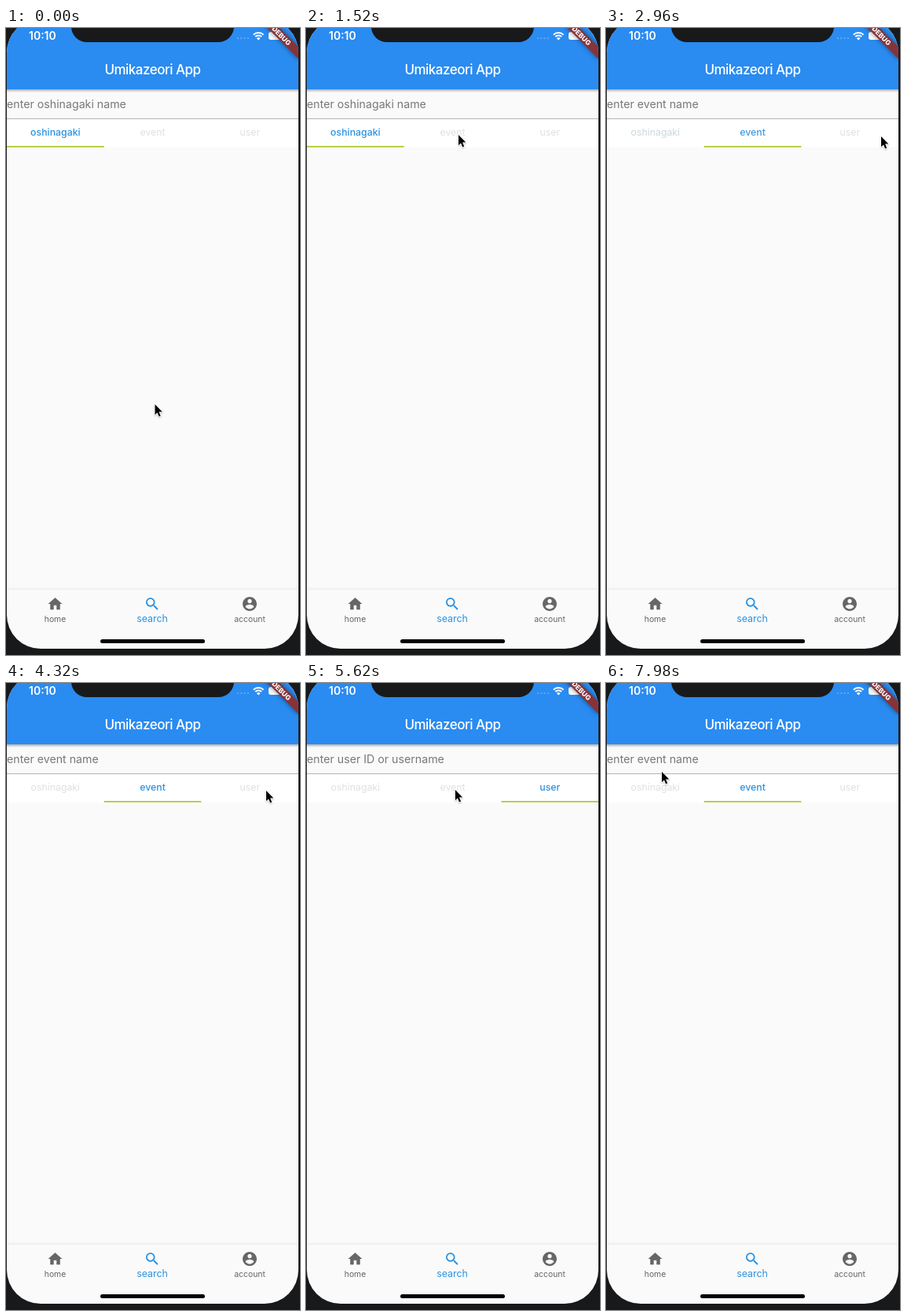
These frames come from a looping animation (374x798 px, 8 s). An HTML page with a canvas:

```html
<!DOCTYPE html>
<html lang="en">
<head>
<meta charset="utf-8">
<title>Search tabs</title>
<style>
  html, body { margin: 0; width: 100%; height: 100%; overflow: hidden; background: #18191b; }
  canvas { display: block; width: 374px; height: 798px; }
</style>
</head>
<body>
<canvas id="stage"></canvas>
<script>
const W = 374, H = 798, LOOP = 8000;
const canvas = document.getElementById('stage');
const ratio = window.devicePixelRatio || 1;
canvas.width = W * ratio;
canvas.height = H * ratio;
const ctx = canvas.getContext('2d');

const FONT = 'Inter, Roboto, sans-serif';
const BEZEL = '#18191b', PAGE = '#fafafa', BAR = '#2a8bf0';
const BLUE = [42, 146, 226], PALE = [224, 224, 222], GREY = '#666', TAB_W = 123.7;
const SCREEN = { x: 1, y: -11.6, w: 371, h: 801.6, r: 43 };

const TABS = ['oshinagaki', 'event', 'user'];
const HINTS = ['enter oshinagaki name', 'enter event name', 'enter user ID or username'];

// Each tap: time and the tab it opens.
const TAPS = [[0, 0], [2400, 1], [4500, 2], [6040, 1]];

// Pointer path: time, x, y of the tip.
const POINTER = [
  [0, 189.5, 479], [120, 189.5, 479], [820, 188, 180], [1240, 194, 137], [1520, 194, 136],
  [2440, 194, 137], [2900, 350, 138], [3500, 350, 138], [4200, 331, 137], [4620, 331, 137],
  [5480, 190, 136], [6080, 189, 136], [6580, 115, 121], [6760, 115, 121], [7600, 71, 113], [8000, 71, 113]
];

const ICONS = {
  home: new Path2D('M10 20v-6h4v6h5v-8h3L12 3 2 12h3v8z'),
  search: new Path2D('M15.5 14h-.79l-.28-.27A6.47 6.47 0 0 0 16 9.5 6.5 6.5 0 1 0 9.5 16c1.61 0 3.09-.59 4.23-1.57l.27.28v.79l5 4.99L20.49 19l-4.99-5zm-6 0C7.01 14 5 11.99 5 9.5S7.01 5 9.5 5 14 7.01 14 9.5 11.99 14 9.5 14z'),
  account: new Path2D('M12 2C6.48 2 2 6.48 2 12s4.48 10 10 10 10-4.48 10-10S17.52 2 12 2zm0 3c1.66 0 3 1.34 3 3s-1.34 3-3 3-3-1.34-3-3 1.34-3 3-3zm0 14.2c-2.5 0-4.71-1.28-6-3.22.03-1.99 4-3.08 6-3.08 1.99 0 5.97 1.09 6 3.08-1.29 1.94-3.5 3.22-6 3.22z')
};
const ARROW = new Path2D('M0 0V13.2L3 10.4 5.1 15.6 7.2 14.7 5.1 9.6H9.3Z');

const clamp = v => Math.min(1, Math.max(0, v));
const lerp = (a, b, k) => a + (b - a) * k;
const smooth = k => k * k * (3 - 2 * k);
const easeOut = k => 1 - Math.pow(1 - k, 2.2);
const mix = (a, b, k) => `rgb(${a.map((v, i) => Math.round(lerp(v, b[i], k))).join(',')})`;

function rect(x, y, w, h, color) {
  ctx.fillStyle = color;
  ctx.fillRect(x, y, w, h);
}

function pill(x, y, w, h, r, color) {
  ctx.fillStyle = color;
  ctx.beginPath();
  ctx.roundRect(x, y, w, h, r);
  ctx.fill();
}

function text(str, x, y, size, color, { weight = 400, align = 'center', spacing = 0 } = {}) {
  ctx.font = `${weight} ${size}px ${FONT}`;
  ctx.letterSpacing = spacing + 'px';
  ctx.textAlign = align;
  ctx.fillStyle = color;
  ctx.fillText(str, x, y);
}

function fade(y, h, from, to) {
  const g = ctx.createLinearGradient(0, y, 0, y + h);
  g.addColorStop(0, from);
  g.addColorStop(1, to);
  rect(0, y, W, h, g);
}

function pointerAt(t) {
  const i = Math.max(1, POINTER.findIndex(p => p[0] > t));
  const [t0, x0, y0] = POINTER[i - 1], [t1, x1, y1] = POINTER[i];
  const k = smooth(clamp((t - t0) / (t1 - t0)));
  return [lerp(x0, x1, k), lerp(y0, y1, k)];
}

function tabState(t) {
  let i = TAPS.length - 1;
  while (TAPS[i][0] > t) i--;
  const [start, tab] = TAPS[i];
  const from = i ? TAPS[i - 1][1] : tab;
  const age = t - start;
  return {
    tab, from,
    line: lerp(from, tab, easeOut(clamp((age - 60) / 420))),
    tint: smooth(clamp((age - 60) / 640))
  };
}

function statusBar() {
  text('10:10', 29, 15, 14, '#fff', { weight: 600, align: 'left' });
  for (let i = 0; i < 4; i++) {
    ctx.fillStyle = 'rgba(255,255,255,.22)';
    ctx.beginPath();
    ctx.arc(295 + i * 4.3, 13, 1.2, 0, Math.PI * 2);
    ctx.fill();
  }
  ctx.strokeStyle = '#fff';
  ctx.lineWidth = 2;
  for (const r of [9, 5.6]) {
    ctx.beginPath();
    ctx.arc(321.2, 15, r, -Math.PI * .75, -Math.PI * .25);
    ctx.stroke();
  }
  ctx.fillStyle = '#fff';
  ctx.beginPath();
  ctx.moveTo(321.2, 15.5);
  ctx.arc(321.2, 15.5, 3.2, -Math.PI * .75, -Math.PI * .25);
  ctx.fill();
  pill(334, 5, 20, 10, 3, '#fff');
}

function ribbon() {
  ctx.save();
  ctx.translate(372, SCREEN.y);
  ctx.rotate(Math.PI / 4);
  ctx.shadowColor = 'rgba(0,0,0,.5)';
  ctx.shadowBlur = 6 * ratio;
  rect(-36, 25.1, 72, 10.8, '#86343a');
  ctx.shadowColor = 'transparent';
  text('DEBUG', 0, 33.6, 8.6, '#fff', { weight: 800 });
  ctx.restore();
}

function tabBar({ tab, from, line, tint }) {
  rect(0, 116, W, 36, '#fff');
  TABS.forEach((name, i) => {
    const on = i === tab ? (from === tab ? 1 : tint) : i === from ? 1 - tint : 0;
    text(name, 1 + TAB_W * (i + .5), 137, 12.3, mix(PALE, BLUE, on), { weight: on > .5 ? 500 : 400 });
  });
  rect(1 + TAB_W * line, 150, TAB_W, 2, '#bccd48');
}

function navItem(name, x, color, size) {
  ctx.save();
  ctx.translate(x - 10.75, 722.3);
  ctx.scale(.896, .896);
  ctx.fillStyle = color;
  ctx.fill(ICONS[name]);
  ctx.restore();
  text(name, x, 755.5, size, color);
}

function screen(t) {
  const state = tabState(t);
  rect(0, 0, W, H, PAGE);
  fade(78, 4, 'rgba(0,0,0,.3)', 'rgba(0,0,0,0)');
  rect(0, 0, W, 78, BAR);
  statusBar();
  text('Umikazeori App', 186.5, 59, 17, '#fff', { weight: 500, spacing: -.5 });
  text(HINTS[state.tab], 1, 102, 14.2, '#787878', { align: 'left' });
  rect(0, 115, W, 1, '#b4b4b4');
  tabBar(state);
  fade(711, 4, 'rgba(0,0,0,0)', 'rgba(0,0,0,.05)');
  navItem('home', 62.5, GREY, 10.4);
  navItem('search', 186, `rgb(${BLUE})`, 12.4);
  navItem('account', 310, GREY, 10.4);
  pill(120, 778, 133, 5, 2.5, '#000');
  ribbon();
}

function notch() {
  pill(83, -30, 207, 48, 20, BEZEL);
}

function pointer(t) {
  const [x, y] = pointerAt(t);
  ctx.save();
  ctx.translate(x, y);
  ctx.lineJoin = 'round';
  ctx.shadowColor = 'rgba(0,0,0,.25)';
  ctx.shadowBlur = 2 * ratio;
  ctx.shadowOffsetY = ratio;
  ctx.strokeStyle = '#fff';
  ctx.lineWidth = 1.6;
  ctx.stroke(ARROW);
  ctx.shadowColor = 'transparent';
  ctx.fillStyle = '#000';
  ctx.fill(ARROW);
  ctx.restore();
}

function draw(t) {
  ctx.setTransform(ratio, 0, 0, ratio, 0, 0);
  rect(0, 0, W, H, BEZEL);
  ctx.save();
  ctx.beginPath();
  ctx.roundRect(SCREEN.x, SCREEN.y, SCREEN.w, SCREEN.h, SCREEN.r);
  ctx.clip();
  screen(t);
  ctx.restore();
  notch();
  pointer(t);
}

const begin = performance.now();
function tick() {
  draw((performance.now() - begin) % LOOP);
  requestAnimationFrame(tick);
}
tick();
</script>
</body>
</html>
```
